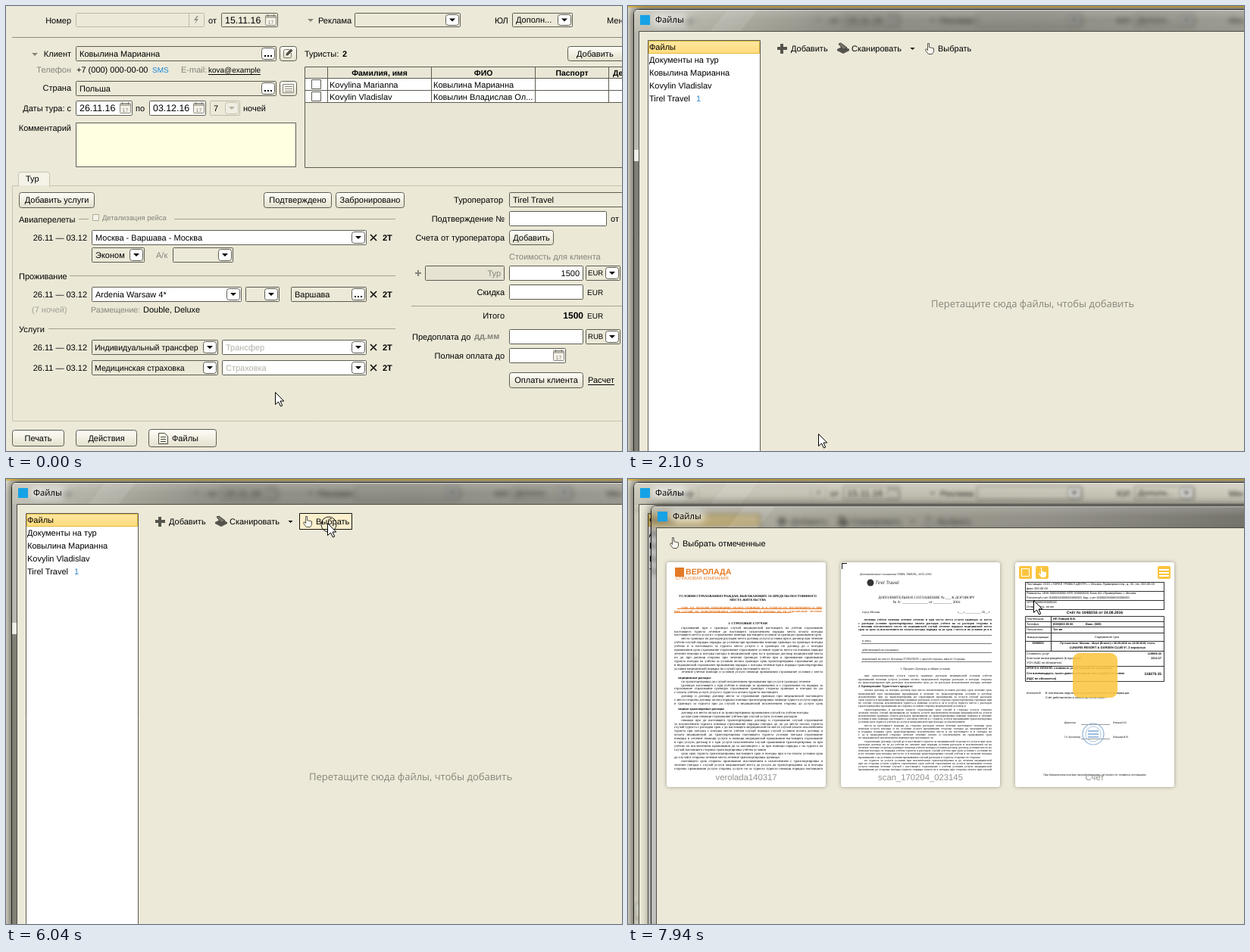
An HTML page with a canvas for the animation above (8000 ms loop, 813 by 588 pixels).

```html
<!DOCTYPE html>
<html lang="ru">
<meta charset="utf-8">
<title>Файлы тура</title>
<style>
html, body { margin: 0; width: 100%; height: 100%; overflow: hidden; background: #ece9d8 }
canvas { display: block }
</style>
<canvas width="813" height="588"></canvas>
<script>
const W = 813, H = 588, LOOP = 8000;
const BG = '#ece9d8', INK = '#000', GRAY = '#85837a', EDGE = '#5d5c52', GOLD = '#fbc540';
const SANS = '"Liberation Sans", sans-serif', SERIF = '"Liberation Serif", serif', OPEN = '"Open Sans", sans-serif';
const screen = document.querySelector('canvas').getContext('2d');
let g = screen;

// ---- drawing helpers ----
function layer(draw) {
  const cv = document.createElement('canvas');
  cv.width = W; cv.height = H;
  g = cv.getContext('2d');
  g.textRendering = 'geometricPrecision';
  draw();
  g = screen;
  return cv;
}
function text(s, x, y, { c = INK, size = 11, w = '', f = SANS, a = 'left', u } = {}) {
  g.font = `${w} ${size}px ${f}`;
  g.fillStyle = c;
  g.textAlign = a;
  g.fillText(s, x, size > 8 ? Math.round(y + size * .36) : y + size * .36);
  if (u) g.fillRect(x, y + 6, Math.round(g.measureText(s).width), 1);
}
function rect(x, y, w, h, fill, stroke, r = 0) {
  const d = stroke ? .5 : 0;
  g.beginPath();
  g.roundRect(x + d, y + d, w - 2 * d, h - 2 * d, r);
  if (fill) { g.fillStyle = fill; g.fill(); }
  if (stroke) { g.strokeStyle = stroke; g.lineWidth = 1; g.stroke(); }
}
function poly(pts, x, y, fill, stroke) {
  g.beginPath();
  for (let i = 0; i < pts.length; i += 2) g.lineTo(x + pts[i], y + pts[i + 1]);
  g.closePath();
  if (fill) { g.fillStyle = fill; g.fill(); }
  if (stroke) { g.strokeStyle = stroke; g.lineWidth = 1; g.stroke(); }
}
function circle(x, y, r, stroke, width = 1, fill) {
  g.beginPath();
  g.arc(x, y, r, 0, 7);
  if (fill) { g.fillStyle = fill; g.fill(); }
  if (stroke) { g.strokeStyle = stroke; g.lineWidth = width; g.stroke(); }
}
function fade(x1, y1, x2, y2, ...colors) {
  const grad = g.createLinearGradient(x1, y1, x2, y2);
  colors.forEach((c, i) => grad.addColorStop(i / (colors.length - 1), c));
  return grad;
}
const hline = (x1, x2, y, c = '#a5a294') => rect(x1, y, x2 - x1, 1, c);
const vline = (x, y1, y2, c = EDGE) => rect(x, y1, 1, y2 - y1, c);
const drop = (x, y, c = INK, r = 4) => poly([-r, 0, r, 0, 0, r], x, y, c);
const hand = (x, y, fill, stroke) =>
  poly([3, 0, 5, 0, 5, 5, 11, 6.5, 11, 11, 9, 14, 4, 14, 0, 9, 1, 7, 3, 9], x + .5, y + .5, fill, stroke);

// ---- form widgets ----
function button(s, x, y, w, h = 21, tx = x + w / 2, lit) {
  const fill = lit ? fade(0, y, 0, y + h, '#ffe59a', '#ffcf4d', '#fdc337') : fade(0, y, 0, y + h, '#fffefa', '#f2efe2', '#e2dfcc');
  rect(x, y, w, h, fill, lit ? '#6b5a25' : EDGE, 3);
  text(s, tx, y + h / 2, { a: tx === x + w / 2 ? 'center' : 'left' });
}
function calendar(x, y) {
  rect(x, y + 1, 15, 14, '#f4f2e8', '#8b897e', 1);
  rect(x + 1, y + 2, 13, 3, '#b9b6a8');
  vline(x + 3, y, y + 3, '#77756a');
  vline(x + 11, y, y + 3, '#77756a');
  text('17', x + 7.5, y + 10, { size: 7, c: '#85837a', a: 'center' });
}
function field(s, x, y, w, { fill = BG, c, btn, h = 20, size, right, edge = EDGE, weak, pad = 5 } = {}) {
  rect(x, y, w, h, fill, edge, 1);
  text(s, right ? x + w - pad : x + pad, y + h / 2, { c, size, a: right ? 'right' : 'left' });
  if (btn === 'cal') return calendar(x + w - 17, y + 2);
  if (!btn) return;
  rect(x + w - 20, y + 2, 18, h - 4, weak ? '#f0eee2' : '#fff', weak ? '#c4c1b2' : EDGE, 3);
  if (btn === 'v') drop(x + w - 11, y + h / 2 - 2, weak ? '#b5b2a4' : INK);
  else [0, 4, 8].forEach(d => rect(x + w - 16 + d, y + h - 8, 2, 2, INK));
}
const label = (s, y, x = 86, c = INK) => text(s, x, y, { a: 'right', c });
function tail(y) {
  g.strokeStyle = INK; g.lineWidth = 1.5;
  g.beginPath();
  g.moveTo(481, y - 4); g.lineTo(489, y + 4);
  g.moveTo(489, y - 4); g.lineTo(481, y + 4);
  g.stroke();
  text('2Т', 497, y, { w: 'bold' });
}

function filesButton(lit) {
  button('Файлы', 188, 559, 90, 24, 219, lit);
  poly([0, 0, 8, 0, 12, 4, 12, 14, 0, 14], 201.5, 564.5, '#f6f3e6', '#4a4940');
  [4, 7, 10].forEach(d => hline(204, 211, 565 + d, '#4a4940'));
}

function drawForm() {
  rect(0, 0, W, H, BG);
  const white = { fill: '#fff' }, gray = { c: GRAY }, date = { btn: 'cal', size: 12.4 };
  const currency = { btn: 'v', size: 9.6, pad: 3 };

  label('Номер', 19);
  field('', 92, 9, 170, { edge: '#bdbaa9', h: 19 });
  vline(241, 10, 27, '#bdbaa9');
  poly([4, 0, 0, 6, 3, 6, 1, 11, 6, 4, 3, 4, 6, 0], 248, 13, '#96948a');
  text('от', 267, 19);
  field('15.11.16', 284, 9, 75, { ...date, h: 19 });
  drop(402, 17, GRAY);
  text('Реклама', 412, 19);
  field('', 460, 9, 140, { btn: 'v', h: 19 });
  text('ЮЛ', 645, 19);
  field('Дополн...', 668, 9, 80, { btn: 'v', h: 19 });
  text('Менеджер', 793, 19);
  hline(8, W, 41, '#8e8b7d');

  drop(38, 62, GRAY);
  label('Клиент', 63);
  field('Ковылина Марианна', 92, 53, 265, { btn: '…' });
  button('', 361, 53, 23, 20);
  rect(366, 57, 11, 12, null, '#77756a', 2);
  poly([0, 7, 7, 0, 10, 3, 3, 10, 0, 10], 369, 56, '#55544b', '#f2efe2');
  label('Телефон', 84, 86, GRAY);
  text('+7 (000) 000-00-00', 93, 84);
  text('SMS', 193, 84, { c: '#1a86d8', size: 10 });
  text('E-mail:', 231, 84, gray);
  text('kova@example', 267, 84, { u: 1, size: 10 });
  label('Страна', 108);
  field('Польша', 92, 99, 265, { btn: '…' });
  button('', 361, 99, 23, 20);
  rect(365, 103, 15, 12, '#f8f6ee', '#8b897e');
  [2, 5, 8].forEach(d => hline(368, 378, 104 + d, '#8b897e'));
  label('Даты тура: с', 135);
  field('26.11.16', 92, 125, 75, { ...date, ...white });
  text('по', 171, 135);
  field('03.12.16', 189, 125, 75, { ...date, ...white });
  field('7', 269, 125, 40, { btn: 'v', edge: '#bdbaa9', weak: 1 });
  text('ночей', 313, 135);
  label('Комментарий', 161);
  rect(92, 154, 291, 59, '#ffffe1', EDGE);

  // tourists
  text('Туристы:', 394, 63);
  text('2', 444, 63, { w: 'bold' });
  button('Добавить', 741, 53, 80, 20, 753);
  rect(394, 80, 430, 134, '#e9e6d5', EDGE);
  rect(395, 96, 420, 31, '#fff');
  [95, 111, 127].forEach(y => hline(394, W, y, EDGE));
  [424, 561, 698, 795].forEach(x => vline(x, 80, 127));
  [['Фамилия, имя', 493], ['ФИО', 630], ['Паспорт', 747], ['День', 814]].forEach(([s, x]) =>
    text(s, x, 88, { w: 'bold', size: 10.4, a: 'center' }));
  [['Kovylina Marianna', 'Ковылина Марианна'], ['Kovylin Vladislav', 'Ковылин Владислав Ол...']].forEach(([a, b], i) => {
    rect(403, 97 + i * 16, 13, 13, '#fff', EDGE);
    text(a, 427, 104 + i * 16);
    text(b, 564, 104 + i * 16);
  });

  // tour tab
  rect(8, 237, 820, 312, '#ebe8d6', '#c6c3b1');
  rect(16, 219, 42, 22, '#f5f3e7', '#c6c3b1', 3);
  rect(17, 237, 40, 5, '#ebe8d6');
  text('Тур', 26, 228);
  button('Добавить услуги', 17, 246, 100);
  button('Подтверждено', 340, 246, 90);
  button('Забронировано', 435, 246, 91);
  text('Авиаперелеты', 17, 282);
  hline(96, 109, 281);
  rect(114, 275, 9, 9, '#f4f2e8', '#aeab9c');
  text('Детализация рейса', 127, 280, { c: GRAY, size: 9.4 });
  hline(222, 514, 281);
  text('Проживание', 17, 357);
  hline(84, 514, 356);
  text('Услуги', 17, 427);
  hline(56, 514, 426);
  [306, 381, 451, 478].forEach(y => { label('26.11 — 03.12', y, 107); tail(y); });
  field('Москва - Варшава - Москва', 113, 296, 363, { ...white, btn: 'v' });
  field('Эконом', 113, 319, 70, { btn: 'v' });
  text('А/к', 198, 329, gray);
  field('', 220, 319, 80, { btn: 'v' });
  field('Ardenia Warsaw 4*', 113, 371, 198, { ...white, btn: 'v' });
  field('', 316, 371, 45, { btn: 'v' });
  field('Варшава', 376, 371, 100, { btn: '…' });
  text('(7 ночей)', 34, 401, { c: '#a19f94' });
  text('Размещение:', 112, 401, { c: GRAY, size: 10.5 });
  text('Double, Deluxe', 181, 401);
  [['Индивидуальный трансфер', 'Трансфер'], ['Медицинская страховка', 'Страховка']].forEach(([a, b], i) => {
    field(a, 113, 441 + i * 27, 167, { btn: 'v', size: 10.6, pad: 4 });
    field(b, 285, 441 + i * 27, 191, { ...white, btn: 'v', c: '#b3b1a8' });
  });

  // payments
  label('Туроператор', 256, 656);
  field('Tirel Travel', 664, 246, 160);
  label('Подтверждение №', 281, 658);
  field('', 664, 271, 129, white);
  text('от', 798, 281);
  label('Счета от туроператора', 306, 658);
  button('Добавить', 664, 296, 59, 20);
  text('Стоимость для клиента', 664, 331, gray);
  rect(540, 352, 8, 2, GRAY);
  rect(543, 349, 2, 8, GRAY);
  field('Тур', 553, 343, 105, { fill: '#e6e3d2', c: GRAY, right: 1 });
  field('1500', 664, 343, 98, { ...white, right: 1 });
  field('EUR', 765, 343, 46, currency);
  label('Скидка', 378, 658);
  field('', 664, 368, 98, white);
  text('EUR', 767, 378, { size: 10 });
  hline(535, W, 396);
  label('Итого', 409, 658);
  text('1500', 762, 409, { w: 'bold', a: 'right', size: 12 });
  text('EUR', 767, 409, { size: 10 });
  text('Предоплата до', 536, 437);
  text('дд.мм', 618, 436, { c: GRAY, w: 'bold' });
  field('', 664, 427, 98, white);
  field('RUB', 765, 427, 46, currency);
  label('Полная оплата до', 462, 658);
  field('', 664, 452, 75, { ...white, btn: 'cal' });
  button('Оплаты клиента', 664, 484, 98, 21);
  text('Расчет', 768, 494, { u: 1 });

  button('Печать', 8, 560, 69, 22);
  button('Действия', 92, 560, 81, 22);
  filesButton(false);
}

// ---- windows ----
// translucent frame: the picture behind shows through, blurred and tinted
function glass(x, y, behind, blur, ...tints) {
  g.save();
  g.shadowColor = 'rgba(0,0,0,.65)';
  g.shadowBlur = 14;
  rect(x, y, 900, 700, BG, '#22221f', 6);
  g.restore();
  g.save();
  g.beginPath();
  g.roundRect(x + 1, y + 1, 900, 700, 5);
  g.clip();
  g.filter = `blur(${blur}px)`;
  g.drawImage(behind, 0, 0);
  g.filter = 'none';
  rect(x, y, W, H, fade(x, 0, W, 0, ...tints));
  rect(x, y, W, 30, fade(0, y, 0, y + 30, 'rgba(255,255,255,.22)', 'rgba(255,255,255,0)', 'rgba(0,0,0,.04)'));
  poly([0, 0, 40, 0, 15, 31, -25, 31], x + 125, y, 'rgba(255,255,255,.1)');
  g.filter = 'blur(4px)';
  rect(x + 24, y + 6, 48, 17, 'rgba(255,255,255,.5)', null, 8);
  g.filter = 'none';
  rect(x + 1, y + 1, W, 1, 'rgba(255,255,255,.6)');
  g.restore();
  rect(x + 7, y + 29, 900, 700, BG, '#4c4b44');
  rect(x + 9, y + 8, 13, 13, '#16a2e6');
  text('Файлы', x + 29, y + 14, { f: OPEN, size: 11.3 });
}

function drawPick() {
  hand(392, 49, '#f8f6ee', '#55544b');
  text('Выбрать', 409, 56);
}
function hoverBox(fill) {
  rect(387, 45, 70, 22, fill, '#111');
  drawPick();
}

function drawFiles(active) {
  rect(0, 0, W, H, fade(0, 0, 8, 0, '#e4e1d1', '#c9c6b7'));
  rect(0, 0, W, 2, '#e3bd4c');
  if (active) {
    glass(7, 4, form, 3, 'rgba(150,150,144,.45)', 'rgba(80,80,76,.58)', 'rgba(80,80,76,.6)', 'rgba(90,90,86,.55)');
    rect(8, 34, 6, 156, '#b9b8af');
    rect(8, 190, 6, 15, '#efeee8');
    rect(8, 205, 6, 400, '#807f76');
  } else glass(7, 4, form, 2, 'rgba(120,119,110,.3)', 'rgba(130,128,118,.4)', 'rgba(130,128,118,.3)');
  rect(26, 45, 149, 560, '#fff', EDGE);
  rect(27, 46, 147, 17, fade(0, 46, 0, 63, '#ffe7a3', '#ffdb79'), '#e3b93e');
  ['Файлы', 'Документы на тур', 'Ковылина Марианна', 'Kovylin Vladislav', 'Tirel Travel'].forEach((s, i) => text(s, 28, 54 + i * 17));
  text('1', 90, 122, { c: '#2c86cf' });
  rect(197, 54, 13, 4, '#55544d');
  rect(201, 50, 4, 13, '#55544d');
  text('Добавить', 215, 56);
  poly([0, 9, 8, 5, 16, 9, 16, 11, 8, 15, 0, 11], 276, 48, '#55544d');
  poly([2, 1, 5, 0, 13, 6, 8, 9], 276, 49, '#77756a', '#3f3e38');
  text('Сканировать', 295, 56);
  drop(375.5, 55, INK, 3);
  drawPick();
  text('Перетащите сюда файлы, чтобы добавить', 400, 393, { f: OPEN, size: 13, c: '#87857b' });
}

// ---- document previews ----
const WORDS = ('страхование расходов случай договор и лечение по поездка туриста на услуги при оплата срок в границах ' +
  'условия стороны медицинской помощи за исключением транспортировка до места проживания с учётом настоящего порядка').split(' ');
let seed = 11;
const rnd = () => (seed = seed * 16807 % 2147483647) / 2147483647;

// justified filler lines with occasional paragraph breaks
function prose(x, y, w, lines, step, opt, breaks = .2) {
  const { size, f = SANS, w: weight = '' } = opt;
  let indent = size * 2;
  for (let i = 0; i < lines; i++, y += step) {
    g.font = `${weight} ${size}px ${f}`;
    const room = w - indent, fits = s => g.measureText(s).width <= room;
    const last = rnd() < breaks, row = [];
    do row.push(WORDS[rnd() * WORDS.length | 0]); while (fits(row.join(' ')));
    row.pop();
    if (last) row.length = Math.ceil(row.length * (.5 + rnd() * .45));
    const s = row.join(' ');
    if (!last) g.wordSpacing = (room - g.measureText(s).width) / (row.length - 1) + 'px';
    text(s, x + indent, y, opt);
    g.wordSpacing = '0px';
    indent = last ? size * 2 : 0;
  }
}

function policyPage() {
  const o = '#e57a26', bold = { f: SERIF, w: 'bold', size: 4.3, a: 'center' }, body = { f: SERIF, size: 4.6 };
  rect(62, 117, 12, 12, o);
  text('ВЕРОЛАДА', 76, 122, { c: o, size: 10.6, w: 'bold' });
  text('СТРАХОВАЯ КОМПАНИЯ', 63, 131, { c: o, size: 5.8 });
  text('УСЛОВИЯ СТРАХОВАНИЯ ГРАЖДАН, ВЫЕЗЖАЮЩИХ ЗА ПРЕДЕЛЫ ПОСТОЯННОГО', 158, 154, bold);
  text('МЕСТА ЖИТЕЛЬСТВА', 158, 159, bold);
  prose(61, 169, 195, 2, 5, { ...body, c: o, w: 'bold' }, 0);
  hline(65, 256, 171, o);
  hline(61, 215, 176, o);
  text('1. СТРАХОВЫЕ СЛУЧАИ', 158, 190, bold);
  prose(61, 196, 196, 13, 4.9, body);
  text('медицинские расходы:', 66, 262, { ...bold, a: 'left' });
  prose(61, 267, 196, 7, 4.9, body);
  text('медико-транспортные расходы:', 66, 303, { ...bold, a: 'left' });
  prose(61, 308, 196, 16, 4.95, body);
}

function contractPage() {
  const body = { f: SERIF, size: 4 }, mid = { ...body, size: 4.9, a: 'center' };
  rect(282, 111, 7, 1, '#111');
  rect(282, 111, 1, 8, '#111');
  text('Дополнительное соглашение TIREL TRAVEL, 2015-2016', 306, 126, { ...body, w: 'italic' });
  circle(320, 137, 4.5, null, 1, '#333');
  text('Tirel Travel', 326, 137, { w: 'italic', size: 6.4, c: '#333' });
  text('ДОПОЛНИТЕЛЬНОЕ СОГЛАШЕНИЕ № ___ К ДОГОВОРУ', 394, 156, mid);
  text('№ А- ______________ от __________ 2016', 394, 162, mid);
  text('город Москва', 309, 176, body);
  text('«___» __________ 20__ г.', 478, 176, { ...body, a: 'right' });
  prose(304, 186, 176, 4, 4.1, { ...body, w: 'bold' }, 0);
  [206, 217, 229, 241].forEach((y, i) => {
    hline(308, 480, y, '#777');
    text(['', 'и лицо,', 'действующий на основании', 'именуемый по тексту Договора ТУРАГЕНТ, с другой стороны, вместе Стороны,'][i], 309, y - 3, body);
  });
  text('1. Предмет Договора и общие условия', 392, 251, { ...body, a: 'center' });
  prose(304, 260, 176, 3, 4.1, body);
  text('2. Бронирование Туристского продукта', 304, 274, { ...body, w: 'bold' });
  prose(304, 279, 176, 26, 4.2, body, .12);
}

function invoicePage() {
  const body = { size: 3.9 }, bold = { ...body, w: 'bold' }, mid = { ...bold, a: 'center' }, edge = '#333';
  const rows = ys => ys.forEach(y => hline(524, 708, y, edge));
  rows([136, 148, 160, 172]);
  vline(524, 136, 172, edge);
  vline(707, 136, 172, edge);
  ['Поставщик: ООО «ТИРЕЛ ТРЕВЕЛ ЦЕНТР», г. Москва, Примерная пер., д. 00, тел. 000-00-00', 'факс 000-00-00',
   'Реквизиты: ИНН 0000000000 КПП 000000000, Банк АО «Примербанк» г. Москва', 'Расчетный счет 00000000000000000000, Кор. счет 00000000000000000000',
   'ОГРН 0000000000000', 'Отправитель: он же'].forEach((s, i) => text(s, 526, 139 + i * 5.9, body));
  text('Счёт № 10482/16 от 24.08.2016', 616, 176, { ...mid, size: 5 });
  rect(524, 181, 184, 87, null, edge);
  rows([188, 195, 203, 214, 227, 247]);
  vline(558, 181, 227, edge);
  ['Плательщик:', 'Телефон:', 'Получатель:'].forEach((s, i) => text(s, 526, 185 + i * 7, body));
  ['ИП Ловцов Б.Б.', '(000)000 00 00               Факс: (000)', 'Тот же'].forEach((s, i) => text(s, 561, 185 + i * 7, bold));
  text('Номер резервации', 541, 209, { ...mid, size: 3 });
  text('Содержание тура', 632, 209, { ...body, a: 'center' });
  text('0000000', 541, 217, mid);
  text('Путешествие: Москва - Море (Египет) с 06.09.2016 по 18.09.2016, отель', 633, 217, { ...mid, size: 3.6 });
  text('LUNARIS RESORT & GARDEN CLUB 5*, 2 взрослых', 633, 223, { ...mid, size: 4 });
  ['Стоимость услуг', 'Агентское вознаграждение (в единицах)', 'УСН (НДС не облагается)'].forEach((s, i) => text(s, 526, 231 + i * 6, body));
  text('119589.32', 704, 231, { ...bold, a: 'right' });
  text('1314.17', 704, 237, { ...bold, a: 'right' });
  text('ИТОГО К ОПЛАТЕ: стоимость услуг указанных за рублями', 526, 250, bold);
  text('Сто восемнадцать тысяч двести семьдесят пять рублей 15 копеек', 526, 257, bold);
  text('(НДС не облагается)', 526, 264, bold);
  text('118275.15', 704, 257, { ...bold, size: 4.8, a: 'right' });
  text('ВНИМАНИЕ:', 526, 283, { size: 3.3 });
  text('В платежном поручении указывать № счёта и № резервации.', 551, 283, body);
  text('Счёт действителен к оплате до 24.08.2016 г.', 551, 289, body);
  [[322, 'Директор', 'Ловцов Б.Б.'], [341, 'Гл. бухгалтер', 'Ловцова В.В.']].forEach(([y, a, b]) => {
    text(a, 576, y, { size: 3.4 });
    hline(598, 636, y + 2, '#999');
    text(b, 640, y, { size: 3.4 });
  });
  circle(614, 337, 14, '#8fb3d8', 1.2);
  circle(614, 337, 10, '#a9c6e3', 1);
  [-4, 0, 4].forEach(d => rect(607, 336 + d, 14, 2, '#9dbde0'));
  text('При безналичном платеже просьба уведомить об оплате по телефону поставщика', 616, 391, { size: 3.5, a: 'center' });
}

function drawPicker() {
  drawFiles(false);
  glass(30, 35, files, 3, 'rgba(110,109,102,.42)', 'rgba(85,84,78,.5)', 'rgba(75,74,70,.56)', 'rgba(66,65,61,.7)');
  hand(55, 77, '#f8f6ee', '#55544b');
  text('Выбрать отмеченные', 72, 85);
  [[51, policyPage, 'verolada140317'], [281, contractPage, 'scan_170204_023145'], [511, invoicePage, 'Счет']].forEach(([x, page, name]) => {
    g.save();
    g.shadowColor = 'rgba(0,0,0,.35)';
    g.shadowBlur = 5;
    rect(x, 110, 210, 297, '#fff', null, 3);
    g.restore();
    page();
    text(name, x + 105, 394, { c: '#92918c', size: 11.3, a: 'center' });
  });
}

function cardTools(x) {
  [5, 27, 188].forEach(d => rect(x + d, 115, 17, 17, GOLD, null, 2));
  rect(x + 8, 118, 11, 11, null, '#fff');
  hand(x + 30, 116, '#fff', GOLD);
  [0, 4, 8].forEach(d => rect(x + 190, 119 + d, 13, 2, '#fff'));
  g.globalAlpha = .88;
  rect(x + 76, 230, 59, 59, GOLD, null, 9);
  g.globalAlpha = 1;
}

// ---- playback ----
const form = layer(drawForm), files = layer(() => drawFiles(true)), picker = layer(drawPicker);

// time, pointer x, pointer y: the pointer jumps like a screen recording
const POINTER = [
  [0, 355, 510], [430, 349, 512], [550, 318, 528], [670, 288, 545], [820, 266, 558], [950, 255, 566],
  [1100, 252, 567], [1250, 251, 568], [1530, 250, 568], [2100, 251, 565], [2240, 264, 552], [2370, 284, 532],
  [2510, 306, 498], [2640, 325, 466], [3220, 318, 430], [3340, 304, 370], [3490, 357, 243], [3640, 402, 145],
  [3770, 431, 71], [3930, 430, 61], [4080, 424, 58], [7090, 425, 80], [7240, 442, 103], [7380, 464, 115],
  [7510, 480, 124], [7650, 499, 136], [7780, 515, 148], [7940, 535, 160]
];

function frame(now) {
  const t = now % LOOP;
  g.textRendering = 'geometricPrecision';
  if (t < 2100) {
    g.drawImage(form, 0, 0);
    if (t >= 950) filesButton(true);
  } else if (t < 6180) {
    g.drawImage(files, 0, 0);
    if (t >= 5910) {
      hoverBox('#fdf0cd');
      circle(426, 60, 10, '#222');
    } else if (t >= 3930) hoverBox('#fbfaf5');
  } else {
    g.drawImage(picker, 0, 0);
    if (t >= 7240 && t < 7650) cardTools(281);
    if (t >= 7780) cardTools(511);
  }
  const [, x, y] = POINTER.findLast(p => p[0] <= t);
  poly([0, 0, 0, 16, 4, 12.5, 7, 18.5, 9.2, 17.5, 6.5, 11.5, 11.3, 11.5], x + .5, y + .5, '#fff', INK);
  requestAnimationFrame(frame);
}
requestAnimationFrame(frame);
</script>
</html>
```
